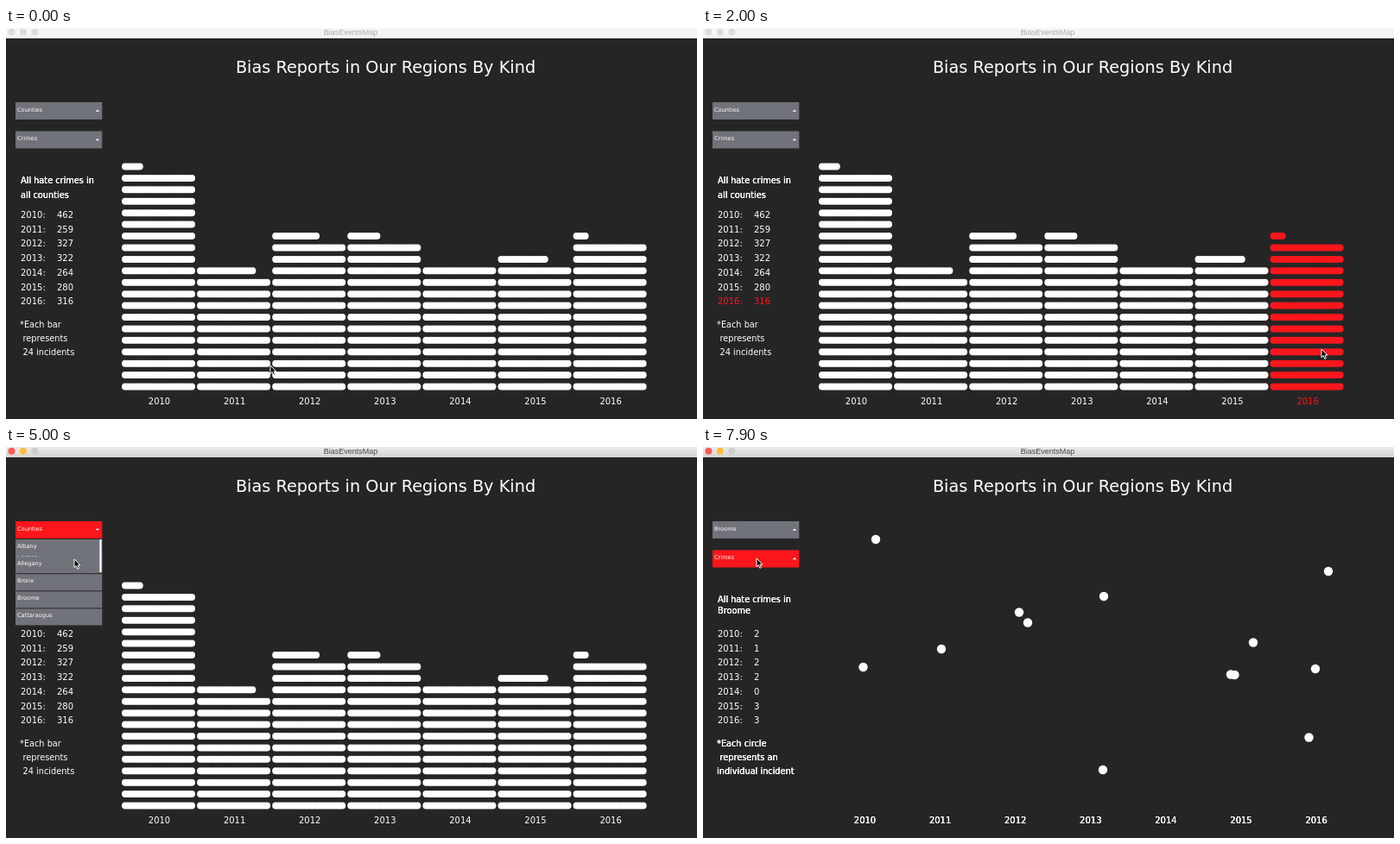
Animation, 800 px wide and 453 px high, one loop 8 s. Source, as an HTML page with a canvas:

```html
<!DOCTYPE html>
<html lang="en">
<head>
<meta charset="utf-8">
<title>Chart</title>
<style>
html, body { margin: 0; width: 100%; height: 100%; overflow: hidden; background: #262526; }
canvas { display: block; }
</style>
</head>
<body>
<canvas id="stage" width="800" height="453"></canvas>
<script>
const ctx = document.getElementById('stage').getContext('2d');
const LOOP = 8000, LAG = 200;
const ACTIVATE = 4400, OPEN = 4700, CLOSE = 6800, SWITCH = 7300;
const WHITE = '#fff', RED = '#fd161b', GREY = '#707379', BACK = '#262526';
const SANS = '"DejaVu Sans", sans-serif';

const totals = [462, 259, 327, 322, 264, 280, 316];
const broome = [2, 1, 2, 2, 0, 3, 3];
const counties = ['Albany', 'Allegany', 'Bronx', 'Broome', 'Cattaraugus'];
const incidents = [[200, 107], [185.5, 255], [276, 234], [366, 191.5], [376, 203.5], [464, 173], [463, 374],
  [611, 263.5], [615.5, 264], [637, 226.5], [724, 144], [709, 257], [701.5, 336.5]];

// Pointer keys: time, x, y
const path = [[0, 306, 391], [500, 350, 384], [900, 472, 376], [1100, 614, 372], [1400, 630, 372], [1700, 662, 372],
  [1800, 714, 372], [2000, 716, 372], [2200, 714, 371], [2500, 382, 366], [2700, 335, 358], [3000, 200, 310],
  [3200, 108, 220], [3400, 81, 130], [3500, 79, 104], [4800, 79, 104], [5000, 79, 130], [5100, 79, 152],
  [5300, 79, 176], [7100, 79, 176], [7600, 62, 129], [8000, 62, 129]];

function pointer(t) {
  const i = Math.max(1, path.findIndex(k => k[0] >= t));
  const [t0, x0, y0] = path[i - 1], [t1, x1, y1] = path[i];
  const p = Math.max(0, (t - t0) / (t1 - t0));
  return [x0 + (x1 - x0) * p, y0 + (y1 - y0) * p];
}

// The program reacts a little later than the pointer moves
function hovered(t, open) {
  if (t < 100) return '';
  const [x, y] = pointer(t - LAG);
  if (x > 134 && y > 140) {
    const i = Math.floor((x - 134) / 87.1);
    return (x - 134) % 87.1 < 85 ? 'bar' + i : '';
  }
  if (x < 11 || x > 111) return '';
  if (y >= 86 && y < 107) return 'counties';
  if (open) return 'row' + Math.floor((y - 107) / 20.1);
  return y > 119 && y < 140 ? 'crimes' : '';
}

function rect(x, y, w, h, color) {
  ctx.fillStyle = color;
  ctx.fillRect(x, y, w, h);
}

function dot(x, y, r, color) {
  ctx.fillStyle = color;
  ctx.beginPath();
  ctx.arc(x, y, r, 0, 7);
  ctx.fill();
}

// Repeated passes thicken the antialiased edges
function text(s, x, y, size, { color = WHITE, passes = 1, align = 'left', font = SANS } = {}) {
  ctx.font = size + 'px ' + font;
  ctx.textAlign = align;
  ctx.fillStyle = color;
  while (passes--) ctx.fillText(s, x, y);
}

function titleBar(active) {
  const fill = ctx.createLinearGradient(0, 0, 0, 12);
  fill.addColorStop(0, active ? '#ebeaeb' : '#f6f6f6');
  fill.addColorStop(1, active ? '#d6d5d6' : '#f3f3f3');
  rect(0, 0, 800, 12, fill);
  const lights = active ? ['#fc5b57', '#fdbc40', '#cfcecf'] : ['#dcdcdc', '#dcdcdc', '#dcdcdc'];
  lights.forEach((c, i) => dot(6.5 + 13.4 * i, 4.7, 4, c));
  text('BiasEventsMap', 399, 8, 9,
    { color: active ? '#444' : '#aaa', align: 'center', font: '"Liberation Sans", Arial, sans-serif' });
}

function bar(i, color) {
  const path = new Path2D();
  for (let n = 0; n < totals[i]; n++) {
    const x = 138 + 87.1 * i + n % 24 * 3.35, y = 415.5 - Math.floor(n / 24) * 13.42;
    path.moveTo(x + 4, y);
    path.arc(x, y, 4, 0, 7);
  }
  ctx.fillStyle = color;
  ctx.fill(path);
}

function header(label, y, hot, open) {
  rect(11, y, 100.3, 20, hot ? RED : GREY);
  text(label, 13, y + 10.8, 6.6);
  const base = y + (open ? 8.8 : 10.8);
  ctx.beginPath();
  ctx.moveTo(103.6, base);
  ctx.lineTo(108.2, base);
  ctx.lineTo(105.9, base + (open ? 2.2 : -2.2));
  ctx.fill();
}

function sidebar(single, hover) {
  const bold = { passes: 3 }, note = { passes: single ? 3 : 1 };
  text('All hate crimes in', 17, 179.5, 9.75, bold);
  text(single ? 'Broome' : 'all counties', 17, single ? 193 : 196.5, 9.75, bold);
  (single ? broome : totals).forEach((n, i) => {
    const y = 219.8 + 16.78 * i, style = { color: hover === 'bar' + i ? RED : WHITE };
    text(2010 + i + ':', 17, y, 10, style);
    text(n, 59, y, 10, style);
  });
  const lines = single ? ['*Each circle', 'represents an', 'individual incident']
                       : ['*Each bar', 'represents', '24 incidents'];
  const left = single ? [16, 19.5, 16] : [16, 19.5, 19.5];
  lines.forEach((s, i) => text(s, left[i], 347 + 16.2 * i, 9.75, note));
}

function chart(single, hover) {
  for (let i = 0; i < 7; i++) {
    const color = hover === 'bar' + i ? RED : WHITE;
    if (!single) bar(i, color);
    text(2010 + i, (single ? 187.5 : 177.5) + 87.1 * i, 435.7, 10,
      { color, align: 'center', passes: single ? 3 : 1 });
  }
  if (single) incidents.forEach(([x, y]) => dot(x, y, 5.2, WHITE));
}

function list(hover) {
  counties.forEach((name, i) => {
    const y = 107 + 20.1 * i;
    rect(11, y, 100.3, 19.1, hover === 'row' + i ? RED : GREY);
    text(name, 13, y + 10, 6.6);
  });
  rect(108.4, 107, 2.2, 38, WHITE);
}

function arrow([x, y]) {
  ctx.save();
  ctx.translate(x, y);
  ctx.beginPath();
  [[0, 0], [0, 9.6], [2.2, 7.6], [3.8, 11.3], [5.5, 10.6], [3.9, 7], [7, 7]].forEach(p => ctx.lineTo(...p));
  ctx.closePath();
  ctx.fillStyle = '#000';
  ctx.strokeStyle = WHITE;
  ctx.lineWidth = 1;
  ctx.fill();
  ctx.stroke();
  ctx.restore();
}

function draw(now) {
  const t = Math.floor(now % LOOP / 100) * 100;
  const open = t >= OPEN && t < CLOSE, single = t >= SWITCH;
  const hover = hovered(t, open);
  rect(0, 0, 800, 453, BACK);
  titleBar(t >= ACTIVATE);
  text('Bias Reports in Our Regions By Kind', 439.5, 52.3, 19.3, { align: 'center' });
  chart(single, hover);
  sidebar(single, hover);
  header('Crimes', 119.5, hover === 'crimes', false);
  header(t >= CLOSE ? 'Broome' : 'Counties', 86, hover === 'counties', open);
  if (open) list(hover);
  arrow(pointer(t));
}

const start = performance.now();
(function tick() {
  draw(performance.now() - start);
  requestAnimationFrame(tick);
})();
</script>
</body>
</html>
```
